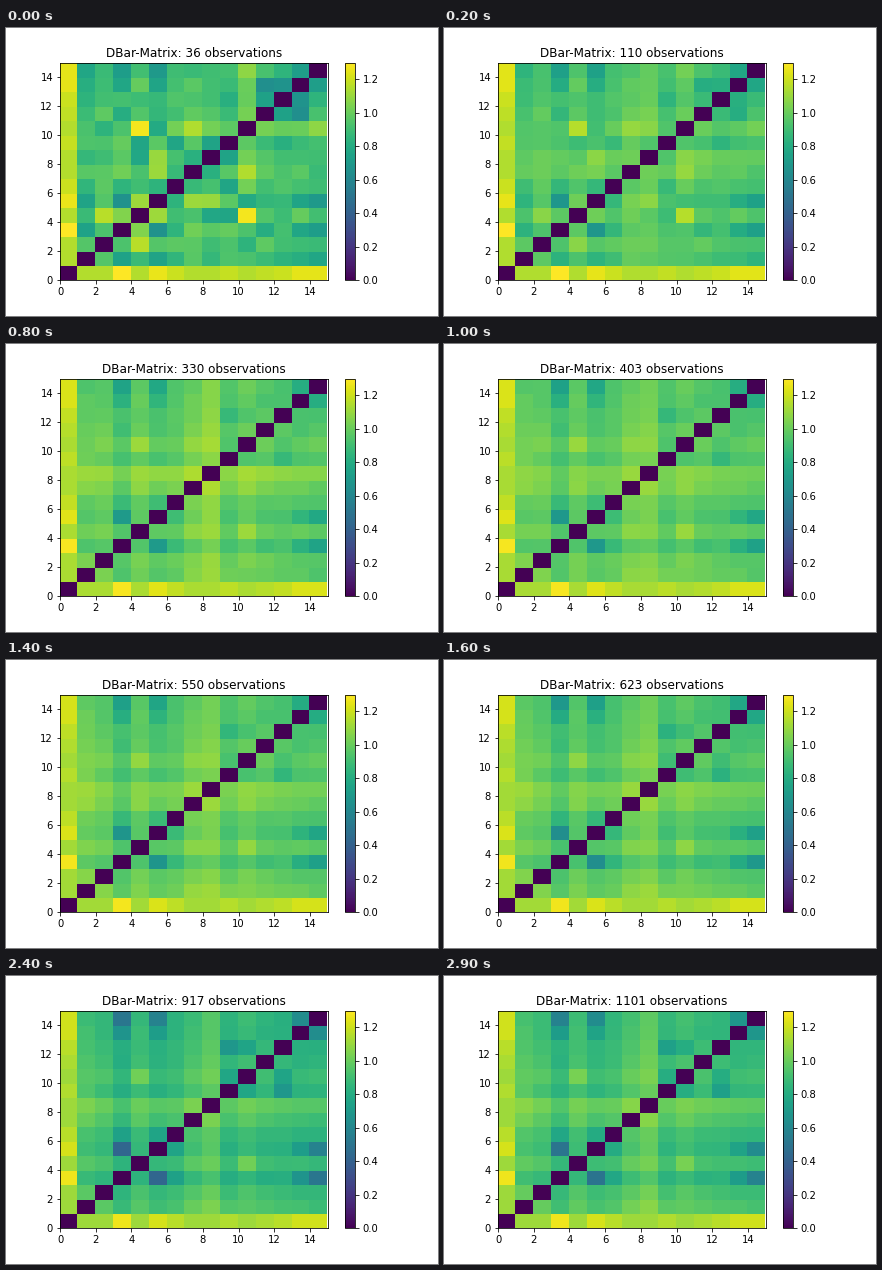
These frames come from a looping animation (432x288 px, 3000 ms). A matplotlib script:

```python
import itertools

import numpy as np
import matplotlib.pyplot as plt
from matplotlib.animation import FuncAnimation
from matplotlib.transforms import Affine2D

SIZE = 15
FRAMES = 30
STEP = 36.7  # observations added per frame

# How far each item sits above or below the mean distance
OFFSET = np.array([0, 11, 3, -13, 4, -9, -4, 10, 15, -3, 5, -2, -4, -8, -8]) / 100

# Pairs that move together (negative) or apart
PULL = {
    (3, 5): -0.32, (3, 14): -0.25, (5, 14): -0.20, (13, 14): -0.15,
    (9, 12): -0.15, (10, 12): -0.13, (9, 10): -0.12, (3, 13): -0.10,
    (5, 13): -0.07, (3, 6): -0.06, (5, 6): -0.06, (4, 10): 0.06,
}

# Groups that differ only while there are few observations
EARLY = [
    ((3, 5), (7, 8, 9), 0.13),
    ((11, 12, 13), (11, 12, 13), -0.20),
    ((1,), (3, 5, 13), -0.07),
    ((6, 8), (7, 9), -0.14),
    ((4,), (2, 3, 5, 10), 0.18),
    ((4,), (7, 8, 9), -0.13),
    ((2, 5), (10,), -0.17),
    ((10,), (1, 6, 7, 8, 9, 11, 12, 13, 14), 0.08),
]


def curve(frame, *points):
    return np.interp(frame, *zip(*points))


def add_pair(matrix, i, j, value):
    matrix[i, j] += value
    matrix[j, i] += value


def early_matrix():
    m = np.zeros((SIZE, SIZE))
    for rows, cols, value in EARLY:
        pairs = {tuple(sorted(p)) for p in itertools.product(rows, cols)}
        for i, j in pairs:
            add_pair(m, i, j, value)
    return m


def pull_matrix():
    m = np.zeros((SIZE, SIZE))
    for (i, j), value in PULL.items():
        add_pair(m, i, j, value)
    return m


EARLY_PART = early_matrix()
PULL_PART = pull_matrix()
noise = np.triu(np.random.default_rng(4).normal(size=(SIZE, SIZE)), 1)
NOISE = noise + noise.T


def matrix_at(frame):
    mean = curve(frame, (0, 0.94), (5, 1.0), (14, 0.985), (20, 0.945),
                 (24, 0.89), (29, 0.915))
    offset = OFFSET.copy()
    offset[1] += curve(frame, (0, -0.20), (14, 0))
    offset[8] += curve(frame, (0, -0.20), (5, 0.17), (10, -0.03), (24, 0.05))

    m = mean + (offset[:, None] + offset) / 2
    m += PULL_PART * curve(frame, (0, 0.5), (14, 0.6), (24, 1.1), (29, 0.95))
    m += EARLY_PART * np.exp(-frame / 2)
    m += NOISE * 0.04 / np.sqrt(1 + frame)

    # Item 0 is far from all, most of all from the low items
    edge = curve(frame, (0, 1.15), (14, 1.12), (24, 1.11))
    m[0] = m[:, 0] = edge - 1.2 * np.minimum(OFFSET, 0)
    np.fill_diagonal(m, 0)
    return m


fig, ax = plt.subplots(figsize=(6, 4), dpi=72)
fig.subplots_adjust(left=0.125, right=0.9, bottom=0.125, top=0.88)
mesh = ax.pcolormesh(matrix_at(0), cmap="viridis", vmin=0, vmax=1.3)
# Cell edges fall on the lower whole pixel instead of the nearest one
mesh.set_transform(ax.transData + Affine2D().translate(-0.499, -0.499))
ax.set(xlim=(0, SIZE), ylim=(0, SIZE))
fig.colorbar(mesh, ax=ax)
title = ax.set_title("", fontsize=12)


def draw(frame):
    mesh.set_array(matrix_at(frame))
    title.set_text(f"DBar-Matrix: {int(STEP * (frame + 1) + 1e-6)} observations")
    return mesh, title


anim = FuncAnimation(fig, draw, frames=FRAMES, interval=1000 / 10, repeat=True,
                     repeat_delay=0, blit=False)
plt.show()
```
